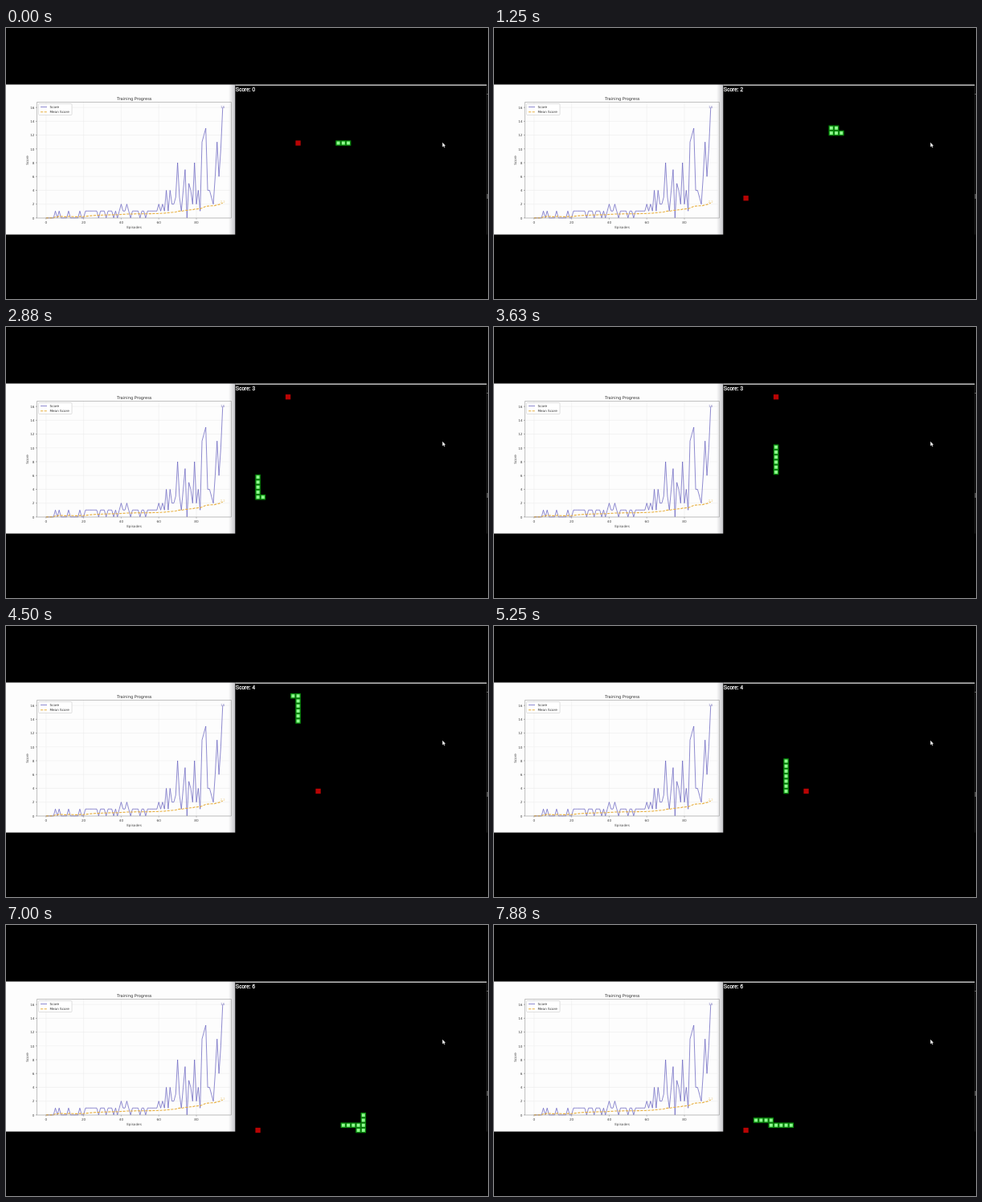
Recreate the animation shown at these times as an HTML page with a canvas. Size 600x338 px, loop 8 s.

```html
<!DOCTYPE html>
<html lang="en">
<head>
<meta charset="utf-8">
<title>Snake training</title>
<style>
  html, body { margin: 0; width: 600px; height: 338px; overflow: hidden; background: #000; }
  canvas { position: absolute; left: 0; top: 0; }
</style>
</head>
<body>
<canvas id="chart" width="600" height="338"></canvas>
<canvas id="game" width="600" height="338"></canvas>
<script>
const LOOP = 8000;
const CELL = 6.25;
const START_LENGTH = 3;
const TOP = 70.5, BOTTOM = 257.6, SPLIT = 285.3;

// Legs of the snake's way over the grid, tail first; * marks food at a leg's end.
const START = [18, 0];
const ROUTE = 'L10* U1 R11 U1* L1 U1 L1 D1 L17 D13* R6 U20* R2 D19 R4* R10 U3* L1 D11 L1 U1 L15 U1 L5';
const LAST_FOOD = [0, 18];
const DIRS = { L: [-1, 0], R: [1, 0], U: [0, -1], D: [0, 1] };

const context = id => document.getElementById(id).getContext('2d');

function text(c, str, x, y, size, color, align = 'left', family = '"DejaVu Sans", sans-serif') {
  c.font = `${size}px ${family}`;
  c.fillStyle = color;
  c.textAlign = align;
  c.fillText(str, x, y);
}

function line(c, points, color, width, dash = []) {
  c.strokeStyle = color;
  c.lineWidth = width;
  c.setLineDash(dash);
  c.beginPath();
  points.forEach(([x, y]) => c.lineTo(x, y));
  c.stroke();
  c.setLineDash([]);
}

// A flat start with blips, a level of 1 with dips and bumps, then a spiky climb.
function makeScores() {
  const blips = [5, 7, 12, 18, 40, 43];
  const dips = [28, 32, 36, 38, 45, 50, 53];
  const level = e => (e > 20 ? 1 : 0) + blips.includes(e) - dips.includes(e);
  const climb = [2, 1, 2, 1, 4, 1, 4, 2, 2, 3, 8, 3, 1, 4, 7, 0, 5, 4,
    2, 8, 2, 4, 1, 11, 12, 13, 4, 4, 3, 2, 6, 11, 6, 10, 16];
  return [...Array.from({ length: 60 }, (_, e) => level(e)), ...climb];
}

function drawChart(c) {
  const px = episode => 49.8 + episode * 2.34;
  const py = score => 236.9 - score * 8.61;
  const left = 38.5, right = 280.5, top = 92.5, bottom = 237;
  const ink = '#4a4a4a', blue = '#6a65c0', orange = '#e8b040';

  const paper = c.createLinearGradient(277, 0, SPLIT, 0);
  paper.addColorStop(0, '#fdfdfd');
  paper.addColorStop(1, '#c4c4c8');
  c.fillStyle = paper;
  c.fillRect(0, TOP, SPLIT, BOTTOM - TOP);

  for (let e = 0; e <= 80; e += 20) {
    line(c, [[px(e), top], [px(e), bottom]], '#ececec', 0.6);
    line(c, [[px(e), bottom], [px(e), bottom + 1.5]], ink, 0.5);
    text(c, e, px(e), 243.9, 4.2, ink, 'center');
  }
  for (let s = 0; s <= 16; s += 2) {
    line(c, [[left, py(s)], [right, py(s)]], '#ececec', 0.6);
    line(c, [[left - 1.5, py(s)], [left, py(s)]], ink, 0.5);
    text(c, s, 35.5, py(s) + 1.7, 4.2, ink, 'right');
  }

  const scores = makeScores();
  let sum = 0;
  const means = scores.map((s, i) => (sum += s) / (i + 1));
  const plot = values => values.map((v, i) => [px(i), py(v)]);
  c.lineJoin = 'round';
  line(c, plot(scores), blue, 0.75);
  line(c, plot(means), orange, 1.1, [3.2, 1.4]);
  const end = scores.length - 1;
  text(c, scores[end], px(end), py(scores[end]) + 0.6, 4.2, '#8f8cc8', 'center');
  text(c, means[end].toFixed(1), px(end), py(means[end]) - 0.5, 3.8, '#eccb80', 'center');

  c.strokeStyle = '#999';
  c.lineWidth = 0.6;
  c.strokeRect(left, top, right - left, bottom - top);

  c.fillStyle = '#fff';
  c.strokeStyle = '#ccc';
  c.beginPath();
  c.roundRect(40.5, 94.5, 41.5, 14, 1);
  c.fill();
  c.stroke();
  line(c, [[43, 98.5], [51, 98.5]], blue, 0.75);
  line(c, [[43, 104.7], [51, 104.7]], orange, 1.1, [3.2, 1.4]);
  text(c, 'Score', 54.5, 100.1, 4.15, '#333');
  text(c, 'Mean Score', 54.5, 106.3, 4.15, '#333');

  text(c, 'Training Progress', 159.8, 89.9, 5.1, '#333', 'center');
  text(c, 'Episodes', 159.5, 249.6, 4.2, ink, 'center');
  c.save();
  c.translate(27.6, 165);
  c.rotate(-Math.PI / 2);
  text(c, 'Score', 0, 0, 4.2, ink, 'center');
  c.restore();
}

function drawWindow(c) {
  const rect = (color, ...box) => {
    c.fillStyle = color;
    c.fillRect(...box);
  };
  rect('#d0d0d0', SPLIT, TOP, 598.4 - SPLIT, 1.4);
  rect('#2a2a2a', 598.4, 72, 0.8, BOTTOM - 72);
  rect('#666', 598.4, 82, 1.6, 1);
  rect('#555', 598.4, 207, 1.6, 6);

  c.fillStyle = '#eee';
  c.beginPath();
  [[543.3, 142.8], [543.3, 148.4], [544.6, 147.2], [545.6, 149.3],
   [546.5, 148.9], [545.5, 146.9], [547.1, 146.8]].forEach(p => c.lineTo(...p));
  c.fill();
}

function buildRoute() {
  const cells = [START], meals = [];
  for (const leg of ROUTE.split(' ')) {
    const [dx, dy] = DIRS[leg[0]];
    for (let n = parseInt(leg.slice(1)); n > 0; n--) {
      const [x, y] = cells[cells.length - 1];
      cells.push([x + dx, y + dy]);
    }
    if (leg.endsWith('*')) meals.push(cells.length - 1);
  }
  return { cells, meals };
}

const { cells, meals } = buildRoute();
const foods = [...meals.map(i => cells[i]), LAST_FOOD];

// About 19 cells a second, slowing down very slightly.
const stepAt = s => Math.floor(0.67 + 19.5 * s - 0.02 * s * s);

function square(c, [col, row], size, color) {
  const x = 313.6 + col * CELL, y = 143.5 + row * CELL;
  c.fillStyle = color;
  c.fillRect(x - size / 2, y - size / 2, size, size);
}

function drawGame(c, step) {
  const head = step + START_LENGTH - 1;
  const score = meals.filter(i => i <= head).length;
  const body = cells.slice(head + 1 - START_LENGTH - score, head + 1);

  c.clearRect(0, 0, 600, 338);
  text(c, `Score: ${score}`, 285.8, 79.3, 6.5, '#fff', 'left', '"Liberation Sans", Arial, sans-serif');
  c.strokeStyle = '#fff';
  c.lineWidth = 0.25;
  c.strokeText(`Score: ${score}`, 285.8, 79.3);

  square(c, foods[score], 6.3, '#b80404');
  c.shadowBlur = 2;
  c.shadowColor = '#030';
  body.forEach(cell => square(c, cell, 6.4, '#0b900f'));
  c.shadowBlur = 0;
  body.forEach(cell => square(c, cell, 3.9, '#8dfb8d'));
}

const chart = context('chart');
const game = context('game');
drawChart(chart);
drawWindow(chart);

// The picture advances eight times a second, on ticks rounded to 10 ms.
const tickAt = time => 2 * Math.floor(time / 250) + (time % 250 >= 130 ? 1 : 0);

let start, shown = -1;
function frame() {
  const now = performance.now();
  start ??= now;
  const tick = tickAt((now - start) % LOOP);
  if (tick !== shown) drawGame(game, stepAt(tick / 8));
  shown = tick;
  requestAnimationFrame(frame);
}
frame();
</script>
</body>
</html>
```
